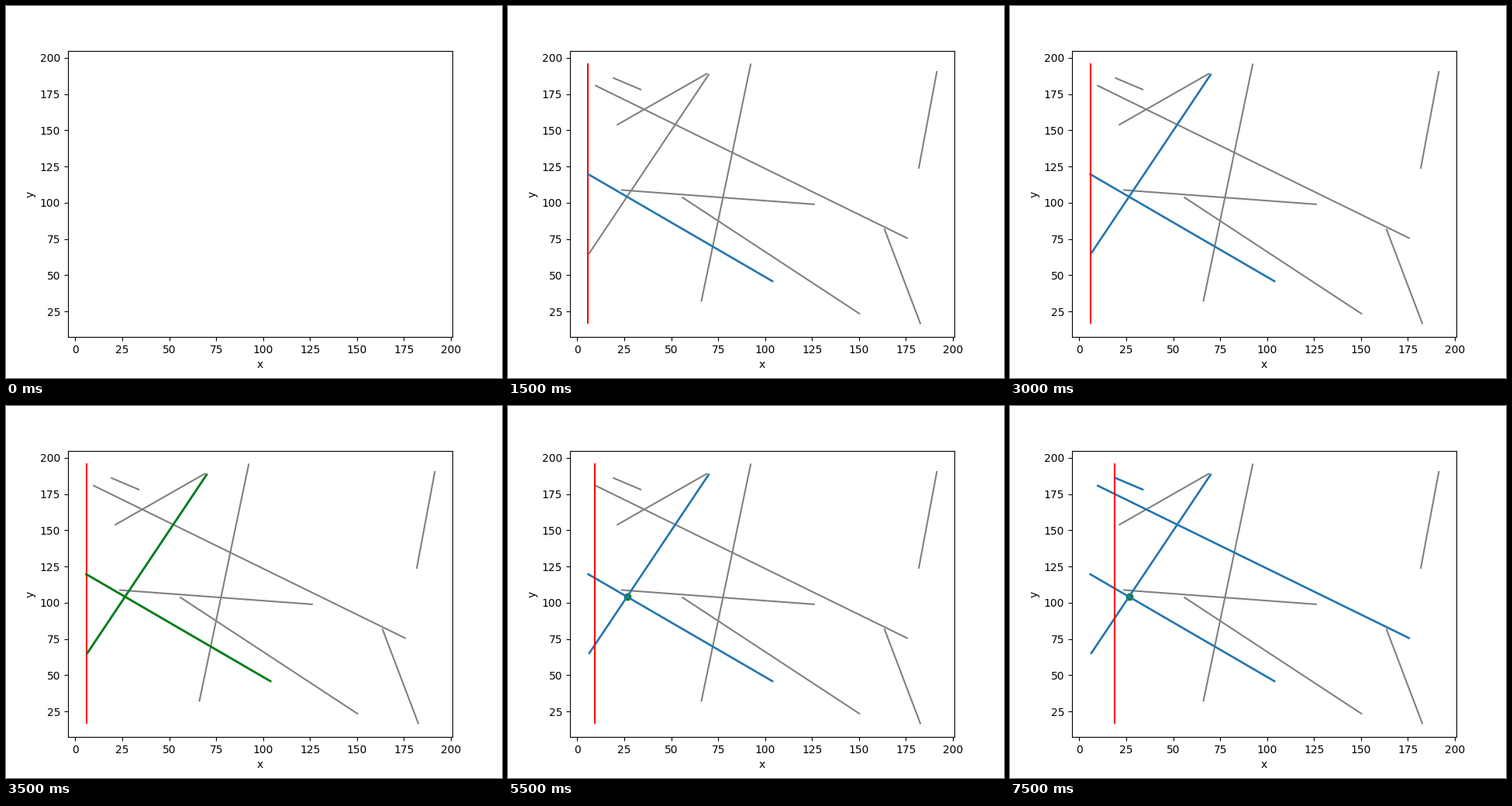
A matplotlib script that plays this animation: 640x480 px, repeating every 8000 ms.

```python
import matplotlib.pyplot as plt
from matplotlib.animation import FuncAnimation
from matplotlib.collections import LineCollection

STEPS = 16
STEP_MS = 500
THIN, BOLD = 1.5, 1.8

# Input of the sweep: two end points per segment, each stored left to right
SEGMENTS = [tuple(sorted(pair)) for pair in (
    ((5.39, 120.0), (104.3, 45.6)),
    ((6.1, 64.7), (70.2, 188.9)),
    ((9.4, 181.0), (176.0, 75.4)),
    ((18.95, 186.2), (34.1, 177.9)),
    ((21.0, 153.6), (69.2, 189.2)),
    ((23.3, 108.8), (126.5, 98.9)),
    ((55.7, 103.9), (150.6, 23.2)),
    ((66.0, 31.8), (92.4, 195.94)),
    ((163.5, 82.1), (182.8, 16.34)),
    ((181.8, 123.5), (191.53, 190.8)),
)]


def padded(values, margin=0.05):
    lo, hi = min(values), max(values)
    pad = margin * (hi - lo)
    return lo - pad, hi + pad


def height(seg, x):
    (x0, y0), (x1, y1) = seg
    return y0 + (y1 - y0) * (x - x0) / (x1 - x0)


def crossing(s, t):
    """Point shared by two segments, or None."""
    lo, hi = max(s[0][0], t[0][0]), min(s[1][0], t[1][0])
    d0, d1 = (height(s, x) - height(t, x) for x in (lo, hi))
    if lo >= hi or d0 * d1 > 0:
        return None
    x = lo + (hi - lo) * d0 / (d0 - d1)
    return x, height(s, x)


xs, ys = zip(*(point for seg in SEGMENTS for point in seg))

fig, ax = plt.subplots(figsize=(6.4, 4.8), dpi=100)
ax.set(xlim=padded(xs), ylim=padded(ys), xlabel="x", ylabel="y")

timeline = []  # (artist, first step, step at which it is gone)


def show(artist, start, stop=STEPS):
    timeline.append((artist, start, stop))


def lines(segments, color, start, stop=STEPS, width=BOLD):
    coll = LineCollection(segments, colors=color, linewidths=width)
    show(ax.add_collection(coll, autolim=False), start, stop)


def run_sweep(step):
    """Stop at each left end, insert the segment and test its neighbours."""
    active = []
    for seg in sorted(SEGMENTS):
        if step >= STEPS:
            return
        x, start = seg[0][0], step
        active.append(seg)
        active.sort(key=lambda s: height(s, x))
        lines([seg], "C0", start + 1)
        step += 2

        at = active.index(seg)
        for other in active[max(at - 1, 0):at] + active[at + 1:at + 2]:
            point = crossing(seg, other)
            if point:
                lines([seg, other], "green", step, step + 2)
                dot = ax.scatter(*point, color="green")
                show(dot, step + 1)
                step += 3

        bar = [(x, min(ys)), (x, max(ys))]
        lines([bar], "red", start, step, THIN)
        # Segments found at this stop lie over the bar
        timeline[-1][0].set_zorder(2 + start / 100)
        for artist, first, _ in timeline:
            if start < first < step and isinstance(artist, LineCollection):
                artist.set_zorder(2 + first / 100)
        step += 1


lines(SEGMENTS, "gray", 1, width=THIN)
run_sweep(2)
ax.set(xlim=padded(xs), ylim=padded(ys))


def update(step):
    for artist, start, stop in timeline:
        artist.set_visible(start <= step < stop)
    return [artist for artist, _, _ in timeline]


anim = FuncAnimation(fig, update, frames=STEPS, init_func=lambda: update(0),
                     interval=STEP_MS, repeat=True, repeat_delay=0)
plt.show()
```
